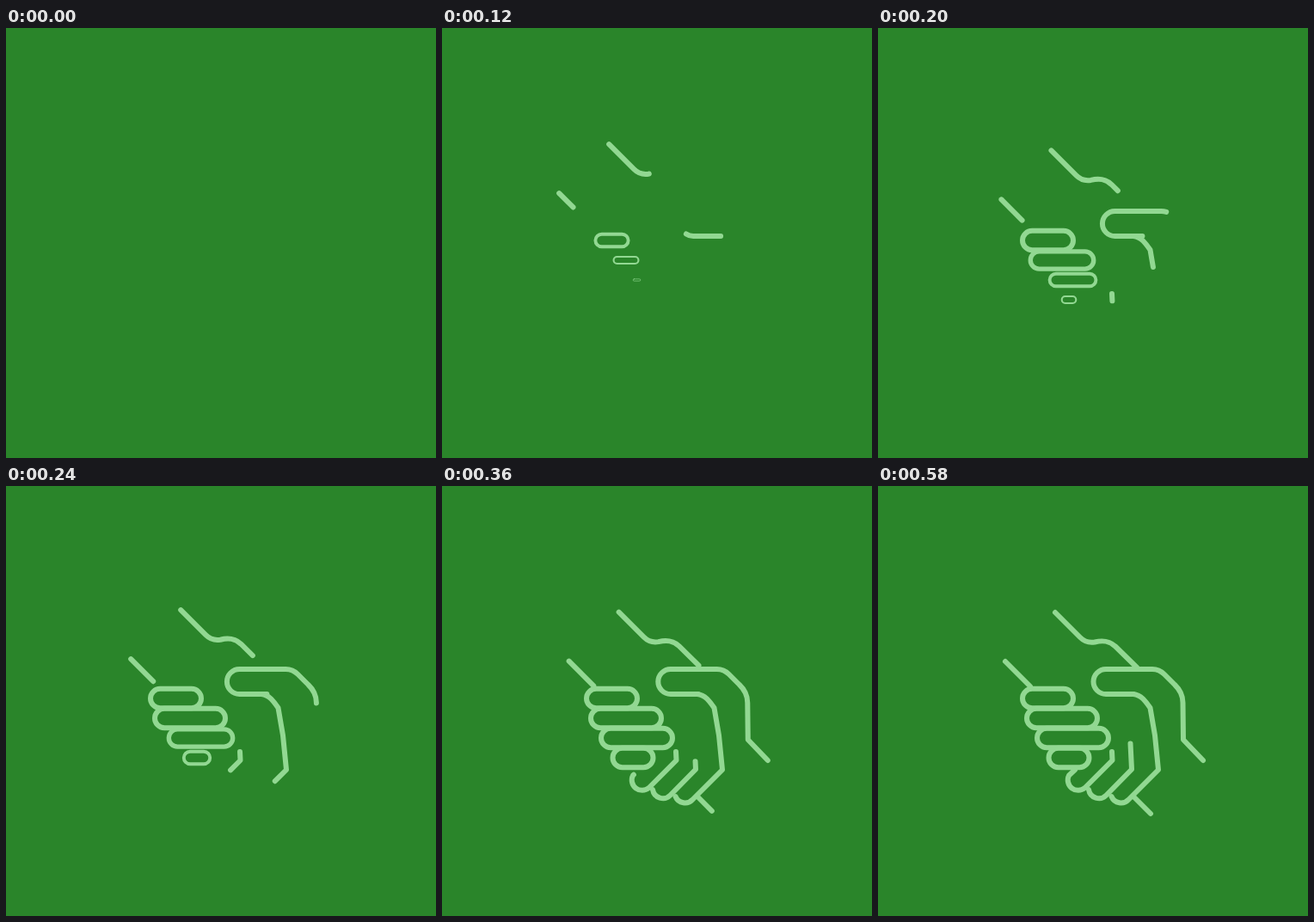
An HTML page for the animation above (1 s loop, 500 by 500 pixels).

```html
<!DOCTYPE html>
<html lang="en">
<head>
<meta charset="utf-8">
<title>Handshake</title>
<style>
  html, body { margin: 0; width: 100%; height: 100%; overflow: hidden; background: #2a852a; }
  svg { display: block; width: 100%; height: 100%; }
</style>
</head>
<body>
<svg id="stage" viewBox="0 0 500 500" fill="none" stroke="#92d892" stroke-width="6"
     stroke-linecap="round" stroke-linejoin="round"></svg>
<script>
const LOOP = 1000, STEP = 20;
const stage = document.getElementById('stage');

// Cubic-bezier easing with control points (x1, 0) and (x2, 1).
const bezier = (x1, x2) => x => {
  if (x <= 0) return 0;
  if (x >= 1) return 1;
  let low = 0, high = 1;
  for (let i = 0; i < 24; i++) {
    const s = (low + high) / 2, r = 1 - s;
    if (3 * s * r * r * x1 + 3 * s * s * r * x2 + s ** 3 < x) low = s; else high = s;
  }
  return low * low * (3 - 2 * low);
};
const smooth = bezier(1 / 3, 2 / 3);
const settle = bezier(1 / 3, 0);
const steep = bezier(.6, .6);

const add = (name, attributes) => {
  const node = document.createElementNS('http://www.w3.org/2000/svg', name);
  for (const key in attributes) node.setAttribute(key, attributes[key]);
  return stage.appendChild(node);
};

// Lines draw themselves; those with a shift also slide into place.
const lines = [
  { start: 0, span: 480, ease: settle, shift: [-27, -27],   // upper side of the left wrist
    d: 'M206 147L235 176C240 181 246 182.5 252 181.5C262 179 269 180 276 186.5L301 211' },
  { start: 0, span: 440, ease: settle, shift: [-27, -27],   // lower side of the left wrist
    d: 'M148 204L177 233' },
  { start: 45, span: 302, ease: smooth, shift: [62, 0],     // thumb and right wrist
    d: 'M297 242H265A14.5 14.5 0 0 1 265 213H319Q327 213 333 219L345 231Q354.5 240 354.5 252L355 295L378 319' },
  { start: 120, span: 180, ease: steep,                     // palm and outer finger
    d: 'M297 242C306 243 311 250 316.5 258L322 290L326 330L291.5 364.5A12 12 0 0 1 271.5 361' },
  { start: 155, span: 250, ease: smooth,                    // inner finger
    d: 'M272 309L272.5 319L240.5 351A12 12 0 0 1 222 336.5L229 330' },
  { start: 282, span: 190, ease: settle,                    // middle finger
    d: 'M245 353A12 12 0 0 0 265.5 359.5L295 329.5L293.5 299.5' },
  { start: 272, span: 190, ease: settle,                    // lower side of the right wrist
    d: 'M297 361L317 381' }
];
for (const line of lines) line.node = add('path', { d: line.d, pathLength: 1 });

// Knuckles pop up one after another: centre x, centre y, width.
const knuckles = [[197.5, 247, 59], [214, 270, 82], [226.5, 293, 83], [222, 316, 47]]
  .map(([x, y, width], i) => ({
    x, y, start: i * 40,
    node: add('rect', { x: -width / 2, y: -11.25, width, height: 22.5, rx: 11.25 })
  }));

function draw(t) {
  const slide = 1 - settle(t / 440);
  for (const { node, start, span, ease, shift: [dx, dy] = [0, 0] } of lines) {
    const drawn = ease((t - start) / span);
    node.setAttribute('visibility', drawn > 0 ? 'visible' : 'hidden');
    node.setAttribute('stroke-dasharray', drawn < 1 ? `${drawn} 2` : 'none');
    node.setAttribute('transform', `translate(${dx * slide} ${dy * slide})`);
  }
  for (const { node, x, y, start } of knuckles) {
    const scale = smooth((t - start) / 200);
    node.setAttribute('visibility', scale > 0 ? 'visible' : 'hidden');
    node.setAttribute('transform', `translate(${x} ${y}) scale(${scale})`);
  }
}

const origin = performance.now();
function tick() {
  const t = (performance.now() - origin) % LOOP;
  draw(Math.floor(t / STEP) * STEP);
  requestAnimationFrame(tick);
}
tick();
</script>
</body>
</html>
```
